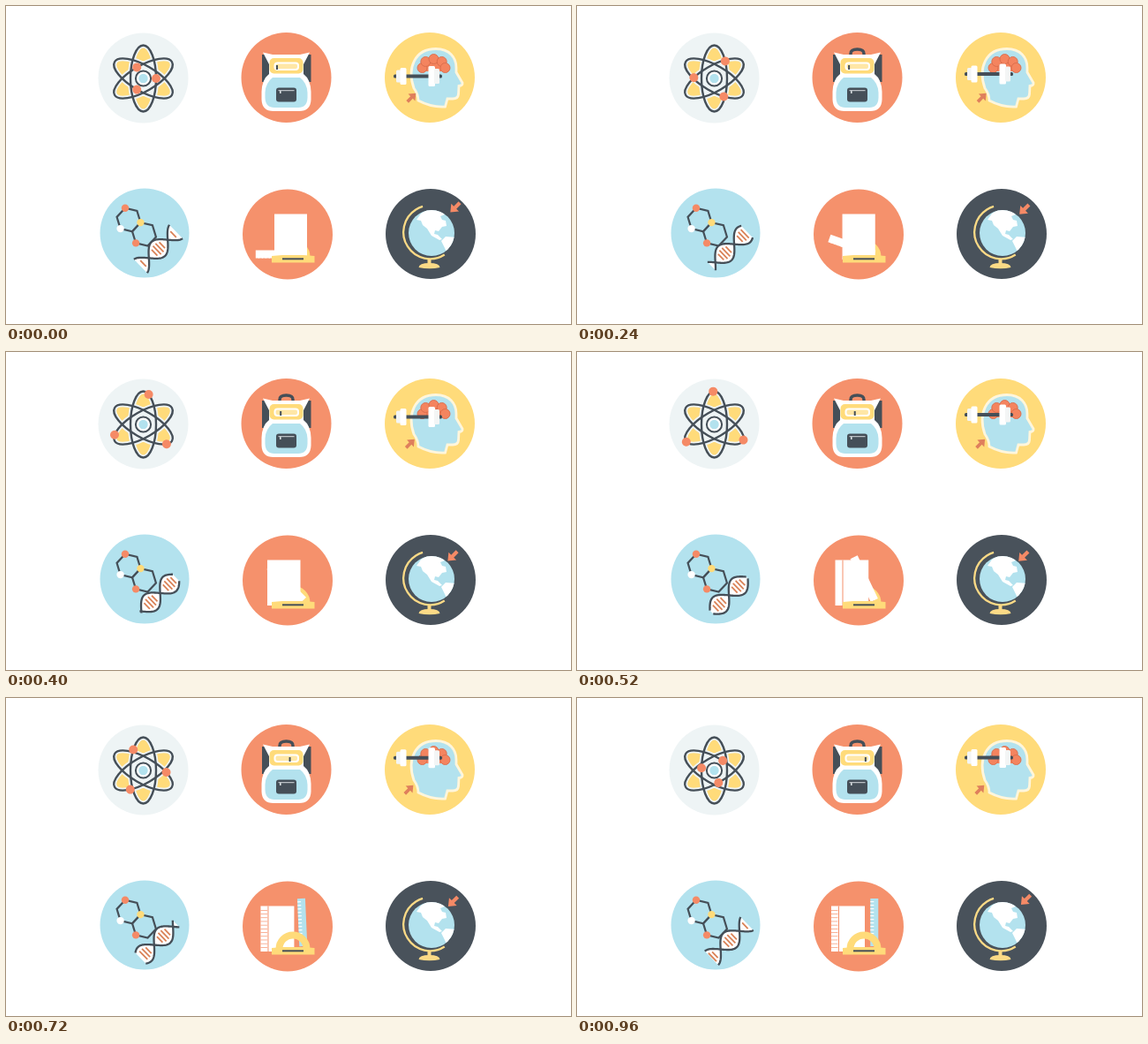
An HTML page with a canvas that plays this animation: 640 px wide and 360 px high, repeating every 1 s.

```html
<!DOCTYPE html>
<html lang="en">
<head>
<meta charset="utf-8">
<title>Science icons</title>
<style>
html, body { margin: 0; width: 100%; height: 100%; overflow: hidden; background: #fff; }
canvas { display: block; }
</style>
</head>
<body>
<canvas id="stage" width="640" height="360"></canvas>
<script>
const g = document.getElementById('stage').getContext('2d');
const LOOP = 1000, STEP = 40, TAU = Math.PI * 2;
const DARK = '#454f58', CORAL = '#f5916c', DOT = '#f58a66', BLUE = '#b3e2ee';
const YELLOW = '#ffdb7a', GOLD = '#fbda86', WHITE = '#fff';

// All motion is a function of u, the position in the loop from 0 to 1.
const smooth = u => u * u * (3 - 2 * u);
const settle = u => smooth(Math.min(1, u / 0.8));
const mix = (a, b, k) => a + (b - a) * k;

function paint(fill, stroke, width, path) {
  const args = path ? [path] : [];
  if (fill) { g.fillStyle = fill; g.fill(...args); }
  if (stroke) { g.strokeStyle = stroke; g.lineWidth = width; g.stroke(...args); }
}

function shape(d, fill, stroke, width) {
  paint(fill, stroke, width, new Path2D(d));
}

function disc(x, y, r, fill, stroke, width) {
  g.beginPath();
  g.arc(x, y, r, 0, TAU);
  paint(fill, stroke, width);
}

function arc(x, y, r, from, to, stroke, width) {
  g.beginPath();
  g.arc(x, y, r, from * TAU, to * TAU);
  paint(null, stroke, width);
}

function rect(x, y, w, h, fill, r = 0) {
  g.beginPath();
  g.roundRect(x, y, w, h, r);
  paint(fill);
}

function line(points, color, width, closed) {
  g.beginPath();
  points.forEach(([x, y]) => g.lineTo(x, y));
  if (closed) g.closePath();
  paint(null, color, width);
}

function placed(x, y, angle, body) {
  g.save();
  g.translate(x, y);
  g.rotate(angle);
  body();
  g.restore();
}

function arrow(x, y, angle, color, size) {
  placed(x, y, angle, () => {
    g.scale(size, size);
    shape('M8 0L0-6.5V-2.2H-8V2.2H0V6.5Z', color);
  });
}

function atom(u) {
  const bg = '#eef4f5', a = 37.5, b = 14.5;
  const phase = Math.PI * (0.5 - u + 0.065 * Math.sin(TAU * u));
  const orbits = [0, 1, 2].map(i => {
    const p = new Path2D();
    p.ellipse(0, 0, b, a, i * TAU / 6, 0, TAU);
    return p;
  });
  disc(155.5, 81.5, 51, bg);
  placed(155.5, 82, 0, () => {
    orbits.forEach(p => paint(YELLOW, null, 0, p));
    orbits.forEach((p, i) => {
      g.save();
      g.clip(p);
      paint(bg, null, 0, orbits[(i + 1) % 3]);
      g.restore();
    });
    orbits.forEach(p => paint(null, bg, 6, p));
    orbits.forEach(p => paint(null, DARK, 2.4, p));
    disc(0, 0, 8.6, WHITE, DARK, 2);
    disc(0, 0, 5.2, BLUE);
    for (let i = 0; i < 3; i++) {
      g.rotate(TAU / 3);
      disc(b * Math.sin(phase), -a * Math.cos(phase), 5, DOT);
    }
  });
}

function backpack(u) {
  disc(317.5, 81, 51, CORAL);
  if (u > 0) shape('M310 56V54Q310 49 317.5 49Q325 49 325 54V56', null, DARK, 3.4);
  rect(290, 55, 55.5, 31, DARK);
  shape('M291 52.5L302 55H333L344 52.5L337 66V77Q345 83 345.5 97V106Q345 119 332 119'
    + 'H303Q290 119 289.5 106V97Q290 83 298 77V66Z', WHITE);
  shape('M302 81H333Q341 87 341.5 98V104Q341 115 331 115H304Q294 115 293.5 104V98Q294 87 302 81Z', BLUE);
  rect(298.5, 59, 38, 17.5, YELLOW, 5);
  rect(303.5, 63.5, 28.5, 9.5, WHITE, 4);
  rect(305.5, 65.5, 24.5, 5.5, '#ffe7a6', 2);
  rect(306, 92.5, 23, 16, DARK, 3);
  rect(308.5, 95.2, 18, 1, '#d7dde0');
  rect(310, 96, 1.6, 3, '#d7dde0');
  rect(306 + 20 * smooth(u) ** 1.5, 67, 2, 5, DARK);
}

function head(u) {
  const lift = settle(u), y = mix(79.5, 67.5, lift);
  disc(480, 81, 51, YELLOW);
  shape('M462 93C454 70 463 48.5 487 48.5C502 48.5 510 58 510 70V75L517 87Q517.5 90 513 90.5'
    + 'L512.5 100Q512 105 506 105H500L497.5 114Q482 115 467 107Q467 100 462 93Z', BLUE, '#fff6dc', 2.8);

  rect(471, 63, 27, 11, '#f4845f', 4);
  for (let i = 0; i < 5; i++) {
    const a = Math.PI * (1 + i / 4);
    disc(484.5 + 13 * Math.cos(a), 70 + 10 * Math.sin(a), 5.5, '#f4845f', '#d96c4c', 0.9);
  }

  rect(439, y - 2, 55, 4, DARK, 1.5);
  rect(442, y - 7, 6, 14, '#f3f5f5', 1.5);
  rect(446.5, y - 9.5, 7, 19, WHITE, 1.5);
  rect(478.5, y - 11.5, 7.5, 23, WHITE, 1.5);
  rect(485, y - 8.5, 6, 17, '#f3f5f5', 1.5);
  arrow(mix(459.5, 456.5, lift), 103.5, -TAU / 8, '#df7f5c', 0.85);
}

function molecule() {
  const r = 13.8, tilt = 0.227, gap = r * Math.sqrt(3);
  const ring = (x, y) => Array.from({ length: 6 }, (_, i) => {
    const a = tilt + i * TAU / 6;
    return [x + r * Math.cos(a), y + r * Math.sin(a)];
  });
  const toNext = tilt + TAU / 12;
  const first = ring(139, 242);
  const second = ring(139 + gap * Math.cos(toNext), 242 + gap * Math.sin(toNext));
  line(first, DARK, 2.2, true);
  line(second, DARK, 2.2, true);
  disc(...first[4], 4.2, DOT);
  disc(...first[0], 4.2, YELLOW);
  disc(...first[2], 4.2, WHITE);
  disc(...second[2], 4.2, DOT);
}

function dna(u) {
  const half = 29.7, amp = 11, end = 28;
  const shift = u * half;
  const wave = s => amp * Math.cos(Math.PI * (s + shift) / half);
  disc(157, 257, 50.5, BLUE);
  molecule();
  placed(172.5, 275, -0.77, () => {
    const upper = [], lower = [];
    for (let s = -end; s <= end; s++) {
      upper.push([s, wave(s)]);
      lower.push([s, -wave(s)]);
    }
    g.beginPath();
    [...upper, ...lower.slice().reverse()].forEach(([x, y]) => g.lineTo(x, y));
    paint(WHITE);
    line(upper, DARK, 2.3);
    line(lower, DARK, 2.3);
    for (let lobe = -1; lobe <= 2; lobe++) {
      for (let k = -1.5; k <= 1.5; k++) {
        const s = lobe * half - shift + k * 4;
        const h = Math.abs(wave(s)) - 4.2;
        if (Math.abs(s) < end - 1) line([[s, -h], [s, h]], '#d98257', 1.8);
      }
    }
  });
}

function ruler(angle, color) {
  placed(336.8, 281, angle, () => {
    rect(-54, -4.5, 54, 9, color);
    for (let x = -51; x < -8; x += 4) rect(x, 0.5, 1.2, 4, WHITE);
  });
}

function protractor() {
  arc(325, 284, 15.5, 0.5, 1, YELLOW, 8);
}

function desk(u) {
  const open = settle(u), done = u > 0.7;
  const left = mix(304, 288, open), width = mix(37, 38, open);
  disc(319, 258.5, 51, CORAL);
  if (open < 0.8) protractor();
  ruler(open * TAU / 4, done ? BLUE : WHITE);
  rect(left, 235.5, width, 51.5, WHITE);
  if (u > 0.5) rect(left + 8, 235.5, 1, 51.5, CORAL);
  if (done) {
    for (let y = 240; y < 286; y += 4.2) rect(left, y, 7.5, 0.7, CORAL);
  }
  if (open >= 0.8) protractor();
  shape('M301 290.5V283L313 282H337L349.5 283V290.5Z', YELLOW);
  rect(313, 285.3, 24, 2, DARK);
}

function globe(u) {
  const d = 3.1 * Math.sin(Math.PI * u);
  disc(481, 258, 51, '#49525b');
  arc(480.5, 256, 30.3, 0.16, 0.705, GOLD, 2.3);
  disc(482, 257, 26, BLUE);
  g.save();
  g.clip();
  shape('M465 242L470 235L478 230H492L497 236L492 238L494 242L498 243L499 249L494 250L490 255L486 254'
    + 'L485 258L489 259L494 264L491 265L482 260L477 252L472 248L470 243Z', WHITE);
  shape('M493 266L498 261L510 262V274L500 281L497 274Z', WHITE);
  g.restore();
  rect(477.5, 287, 4, 6, GOLD);
  shape('M467.5 296Q468 291 479.5 291Q491 291 491.5 296Q480 298.5 467.5 296Z', GOLD);
  arrow(508.7 - d, 228.2 + d, TAU * 3 / 8, DOT, 0.95);
}

const icons = [atom, backpack, head, dna, desk, globe];

function draw() {
  const u = Math.floor(performance.now() % LOOP / STEP) * STEP / LOOP;
  rect(0, 0, 640, 360, WHITE);
  icons.forEach(icon => icon(u));
  requestAnimationFrame(draw);
}
draw();
</script>
</body>
</html>
```
